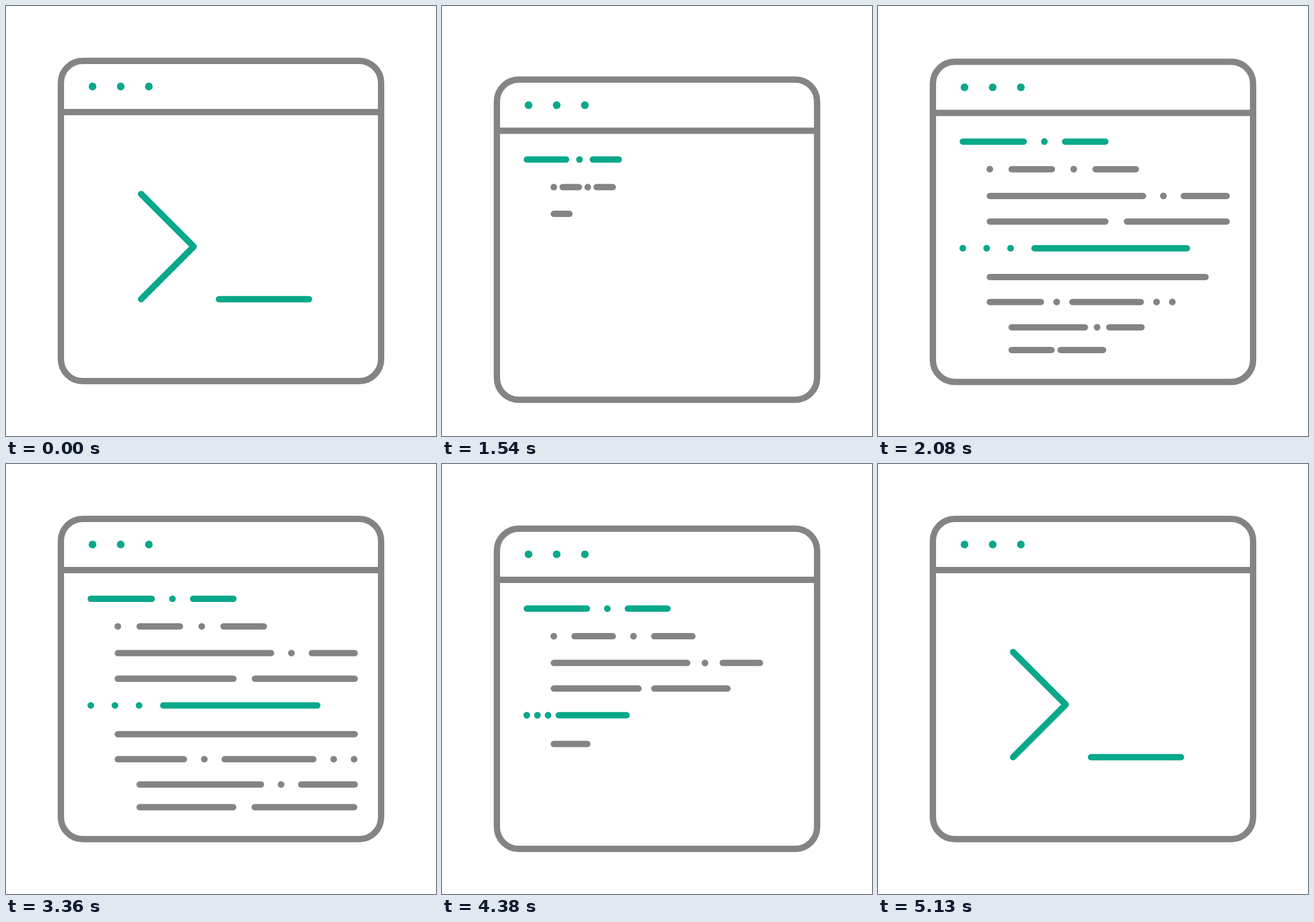
An HTML page with a canvas that plays this animation: 748x748 px, repeating every 5160 ms.

```html
<!DOCTYPE html>
<html lang="en">
<head>
<meta charset="utf-8">
<title>Terminal window</title>
<style>
  html, body { margin: 0; width: 100%; height: 100%; overflow: hidden; background: #fff; }
  canvas { display: block; }
</style>
</head>
<body>
<canvas id="stage" width="748" height="748"></canvas>
<script>
const ctx = document.getElementById('stage').getContext('2d');
const LOOP = 5160, STEP = 30, MIRROR = 6130;
const GRAY = '#848484', GREEN = '#08a88a';
const INDENT = [147.5, 194.5, 232.5];

// Code rows: height, indent level, gap, then part lengths (0 is a dot)
const ROWS = [
  { y: 234.5, level: 0, gap: 36, parts: [106, 0, 70] },
  { y: 282.5, level: 1, gap: 38, parts: [70, 0, 70] },
  { y: 329, level: 1, gap: 35.5, parts: [266.5, 0, 74.5] },
  { y: 373.5, level: 1, gap: 37.5, parts: [201, 173.5] },
  { y: 420, level: 0, gap: 42, parts: [0, 0, 0, 268] },
  { y: 470, level: 1, gap: 0, parts: [412] },
  { y: 513.5, level: 1, gap: 35.5, parts: [115, 0, 154, 0, 0] },
  { y: 557.5, level: 2, gap: 35, parts: [211, 0, 93] },
  { y: 597, level: 2, gap: 37.5, parts: [163, 173.5] }
];
ROWS[1].parts.unshift(0);

const progress = (t, start, length) => Math.min(1, Math.max(0, (t - start) / length));
const easeOut = u => 1 - (1 - u) ** 3;

// Cubic easing with flat ends and handles at x1 and x2
function ease(u, x1, x2) {
  let lo = 0, hi = 1, s = u;
  for (let i = 0; i < 20; i++) {
    s = (lo + hi) / 2;
    const x = 3 * s * (1 - s) * ((1 - s) * x1 + s * x2) + s ** 3;
    if (x < u) lo = s; else hi = s;
  }
  return s * s * (3 - 2 * s);
}

function dot(x, y, r, color) {
  ctx.fillStyle = color;
  ctx.beginPath();
  ctx.arc(x, y, r, 0, 2 * Math.PI);
  ctx.fill();
}

function line(points, color) {
  ctx.strokeStyle = color;
  ctx.beginPath();
  points.forEach(([x, y]) => ctx.lineTo(x, y));
  ctx.stroke();
}

function drawWindow() {
  ctx.strokeStyle = GRAY;
  ctx.beginPath();
  ctx.roundRect(95.5, 95.5, 557, 557, 38);
  ctx.stroke();
  line([[96, 184.5], [652, 184.5]], GRAY);
  for (let i = 0; i < 3; i++) dot(150.5 + 49 * i, 140, 6.7, GREEN);
}

function drawPrompt(t) {
  const left = 1 - ease(progress(t, 1000, 400), .33, .67);
  if (left < .005) return;
  const run = 183 * left, bend = Math.min(run, 91.5);
  line([[235, 327], [235 + bend, 327 + bend], [235 + 2 * bend - run, 327 + run]], GREEN);
  line([[370.5, 510], [370.5 + 156.5 * left, 510]], GREEN);
}

// Rows start one after another; the later ones grow more slowly
function drawRow(t, { y, level, gap, parts }, i) {
  const start = 1410 + 59 * i + i * i / 2;
  const grow = easeOut(progress(t, start, Math.max(445, 105 + 110 * i)));
  if (!grow) return;
  const color = level ? GRAY : GREEN;
  let x = INDENT[level];
  for (const part of parts) {
    const length = part * grow;
    if (part) line([[x, y], [x + length + .01, y]], color);
    else dot(x, y, 5.8, color);
    x += length + gap * grow;
  }
}

function draw(t) {
  const rise = ease(progress(t, 1000, 424), .33, .67);
  const fall = ease(progress(t, 1424, 820), .33, .38);
  ctx.setTransform(1, 0, 0, 1, 0, 0);
  ctx.fillStyle = '#fff';
  ctx.fillRect(0, 0, 748, 748);
  ctx.translate(0, 35 * (rise - fall));
  ctx.lineWidth = 11;
  ctx.lineCap = ctx.lineJoin = 'round';
  drawWindow();
  drawPrompt(t);
  ROWS.forEach((row, i) => drawRow(t, row, i));
}

// The second half plays the first half backwards
function poseTime(t) {
  return t < MIRROR / 2
    ? Math.floor((t - 10) / STEP) * STEP + 10
    : MIRROR - Math.floor(t / STEP) * STEP;
}

function tick() {
  draw(poseTime(performance.now() % LOOP));
  requestAnimationFrame(tick);
}
tick();
</script>
</body>
</html>
```
